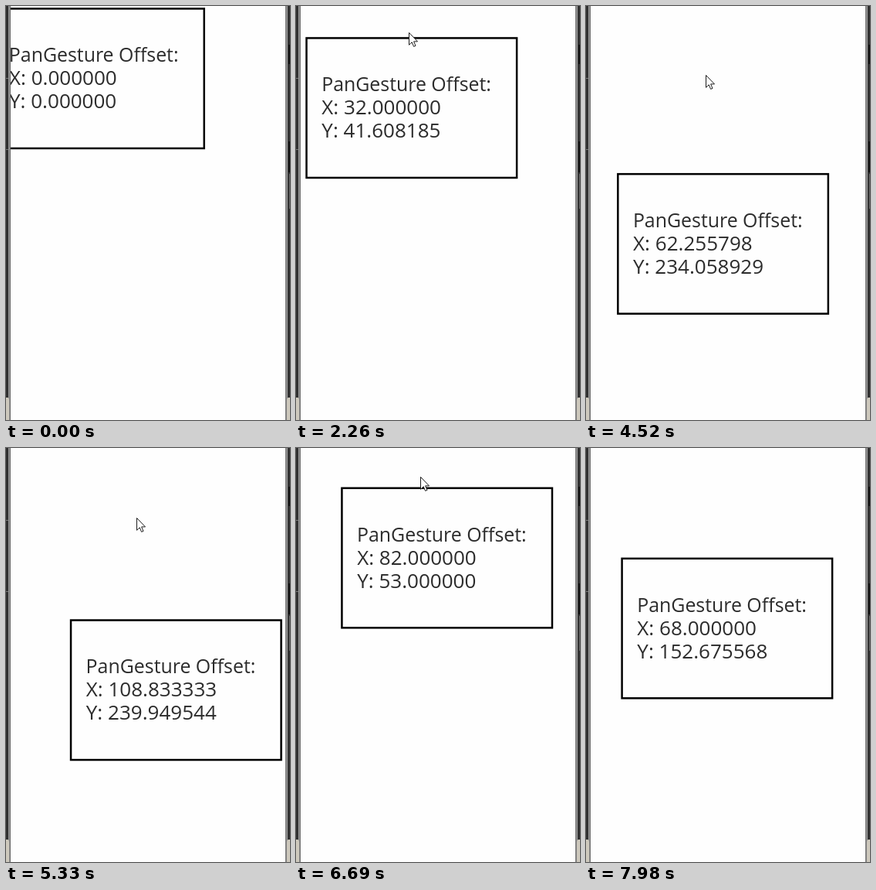
Write an HTML page that moves like this. It is 368 px wide and 535 px high and loops after 9230 ms.

```html
<!DOCTYPE html>
<html lang="en">
<head>
<meta charset="utf-8">
<title>Pan gesture</title>
<style>
  html, body { margin: 0; width: 100%; height: 100%; overflow: hidden; background: #fefefe; }
  svg { display: block; }
  text { font: 24.9px "Open Sans", "Noto Sans", sans-serif; fill: #2c2c2c; white-space: pre; }
  .value { font-size: 26px; }
</style>
</head>
<body>
<svg width="368" height="535" viewBox="0 0 368 535">
  <defs>
    <clipPath id="screen"><rect x="6" width="355" height="535"/></clipPath>
    <g id="edge">
      <rect width="3" height="535" fill="#303030"/>
      <rect x="3" width="2" height="535" fill="#929292"/>
      <rect x="5" width="1" height="535" fill="#6c6c6c"/>
      <path d="M0 506h2q2 0 2 4v25H0z" fill="#cdc8bc"/>
    </g>
  </defs>
  <rect width="368" height="535" fill="#fefefe"/>
  <use href="#edge"/>
  <path d="M0 93.5h3M0 185.5h3" stroke="#777"/>
  <use href="#edge" transform="matrix(-1 0 0 1 368 0)"/>
  <path d="M367 50v25M367 175v40" stroke="#101010" stroke-width="2"/>
  <path d="M367.5 217v45" stroke="#686868"/>
  <g clip-path="url(#screen)">
    <g id="box">
      <rect x="1.25" y="1.25" width="272.5" height="180.5" fill="none" stroke="#000" stroke-width="2.5"/>
      <text x="20.8" y="70">PanGesture Offset:</text>
      <text id="xText" class="value" x="21" y="100"></text>
      <text id="yText" class="value" x="21" y="130"></text>
    </g>
  </g>
  <path id="cursor" d="M.5.5V16.3L4.2 12.8L6.6 18.4L9 17.4L6.6 11.9H11.5z" fill="#fff" stroke="#1c1c1c" stroke-linejoin="round"/>
</svg>
<script>
  const LOOP = 9230, STEP = 40;
  const ENTER = 210, ARRIVE = 970, LEAVE = 7820, GONE = 7980;

  // Drag strokes: start, end, offset reached
  const strokes = [
    [1660, 2260, 32, 41.608185],
    [2300, 2620, 49, 73],
    [2660, 2900, 60, 126],
    [3060, 3220, 110, 159.724548],
    [3470, 3910, 49, 221],
    [4200, 4520, 62.255798, 234.058929],
    [4520, 4920, 112, 259],
    [5170, 6130, 93, 144.697266],
    [6130, 6690, 82, 53],
    [6690, 7090, 20, 97],
    [7090, 7610, 68, 152.675568]
  ];

  const $ = id => document.getElementById(id);
  const box = $("box"), xText = $("xText"), yText = $("yText"), cursor = $("cursor");

  const mix = (a, b, u) => a * (1 - u) + b * u;
  const mixPoint = (p, q, u) => p.map((v, i) => mix(v, q[i], u));
  const curve = (p, c, q, u) => mixPoint(mixPoint(p, c, u), mixPoint(c, q, u), u);

  // Progress from start to end, moving once per step
  function progress(t, start, end) {
    const held = Math.floor((t - start) / STEP) * STEP;
    return Math.min(1, Math.max(0, held / (end - start)));
  }

  const offsetAt = t => strokes.reduce(
    (at, [start, end, ...goal]) => mixPoint(at, goal, progress(t, start, end)), [0, 0]);

  // The pointer comes in, drags along with the offset, then swings out
  function pointerAt(t, [x, y]) {
    const drag = [137 + 0.29 * x, 22 + 0.285 * y];
    if (t < ARRIVE) return curve([0, 294], [300, 150], drag, progress(t, ENTER, ARRIVE));
    return curve(drag, [120, 115], [52, 234], progress(t, LEAVE, GONE - STEP));
  }

  const move = (el, x, y) => el.setAttribute("transform", `translate(${x} ${y})`);

  function draw(t) {
    const offset = offsetAt(t), [x, y] = offset;
    move(box, 0.917 * x - 17, 0.913 * y + 2.2);
    xText.textContent = "X: " + x.toFixed(6);
    yText.textContent = "Y: " + y.toFixed(6);
    move(cursor, ...pointerAt(t, offset).map(Math.round));
    cursor.style.display = t >= ENTER + STEP && t < GONE ? "" : "none";
  }

  const begin = performance.now();
  function tick() {
    draw((performance.now() - begin) % LOOP);
    requestAnimationFrame(tick);
  }
  tick();
</script>
</body>
</html>
```
